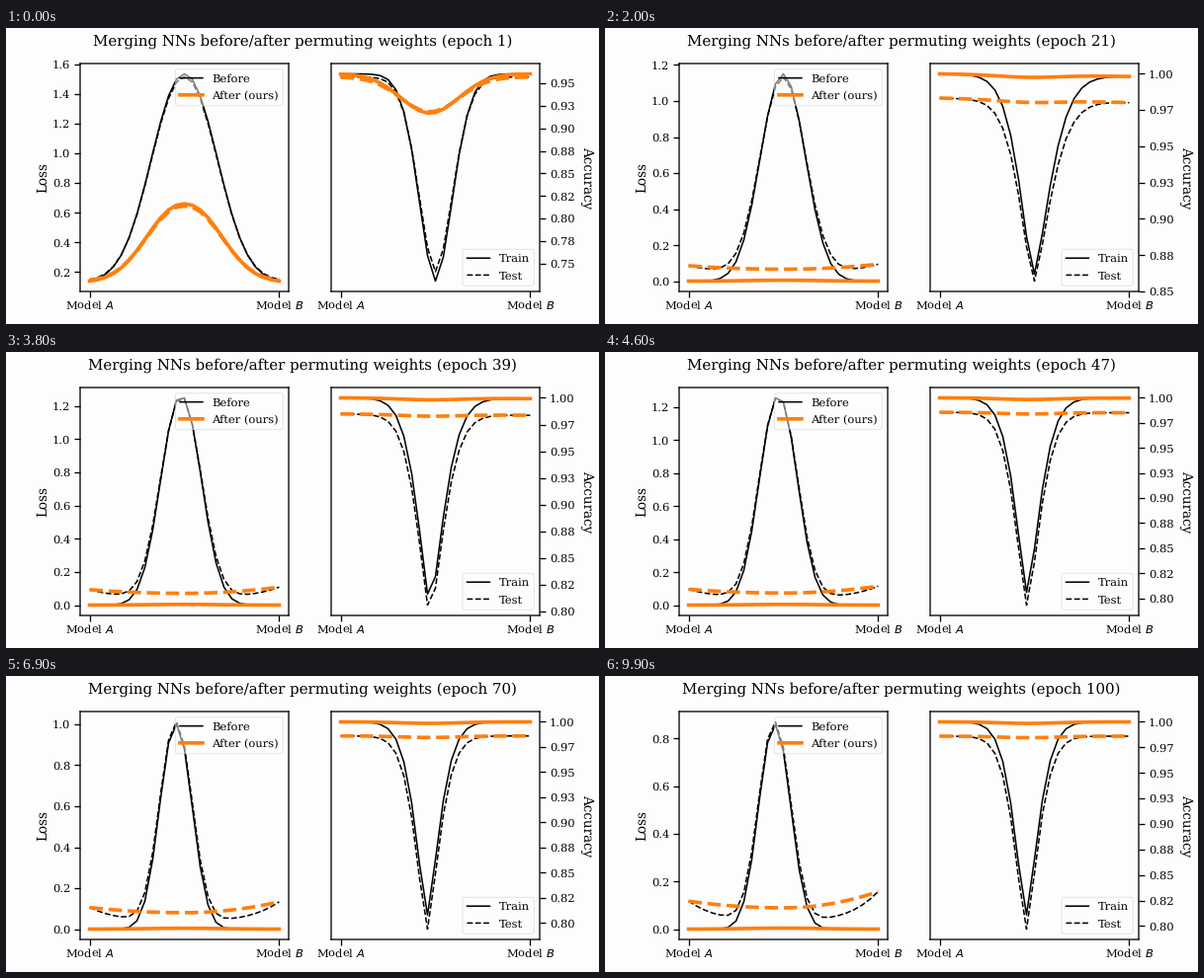
Animation, 600 px wide and 300 px high, one loop 10000 ms. Source, as a matplotlib script:

```python
import matplotlib.pyplot as plt
import numpy as np
from matplotlib.animation import FuncAnimation
from matplotlib.lines import Line2D
from matplotlib.ticker import FixedLocator, FuncFormatter, MultipleLocator

W, H, DPI = 600, 300, 75
FRAMES, INTERVAL = 100, 100
PAPER = "#fdfdfd"

plt.rcParams.update({
    "font.family": "DejaVu Serif",
    "font.size": 12,
    "text.hinting": "none",
    "path.snap": False,
    "legend.fontsize": 11,
    "legend.framealpha": 0.5,
    "legend.labelspacing": 0.57,
    "axes.linewidth": 1.25,
    "axes.facecolor": PAPER,
    "figure.facecolor": PAPER,
    "xtick.major.pad": 1.2,
})
for axis in ("xtick", "ytick"):
    plt.rcParams.update({
        f"{axis}.labelsize": 11,
        f"{axis}.major.size": 6,
        f"{axis}.major.width": 1.25,
    })

IDX = np.arange(25)
LAM = IDX / 24

# Height of the barrier between the two models at a few epochs.
KEYS = (1, 12, 31, 47, 70, 100)
LOSS_PEAK = (1.535, 1.025, 1.238, 1.257, 1.0, 0.857)
ACC_DIP = (0.23, 0.09, 0.17, 0.194, 0.192, 0.189)


def key(values, epoch):
    return np.interp(np.log(epoch), np.log(KEYS), values)


def fade(epoch):
    """Share of the early, untrained phase that is left."""
    return np.exp(-(epoch - 1) / 3)


def drift(epoch, end):
    """Smooth shift of the barrier from epoch 12 to its final place."""
    t = np.clip((epoch - 12) / (end - 12), 0, 1)
    return t * t * (3 - 2 * t)


def bump(centre, left, right, power):
    d = IDX - centre
    b = np.exp(-(np.abs(d) / np.where(d < 0, left, right)) ** power)
    return b / b.max()


def bowl(start, floor, end, power):
    fall = np.clip(1 - 2 * LAM, 0, 1) ** power
    rise = np.clip(2 * LAM - 1, 0, 1) ** power
    return floor + (start - floor) * fall + (end - floor) * rise


def loss(kind, split, e):
    f, d = fade(e), drift(e, 76)
    before, test = kind == "before", split == "test"
    if test:
        floor = 0.055 - 0.00015 * e + 0.08 * f if before else 0.06 + 0.0003 * e + 0.075 * f
        ends = 0.078 + 0.06 * f
        base = bowl(ends + 0.0004 * e, floor, ends + 0.0008 * e, 3.5 if before else 2)
    else:
        floor = 0.001 + 0.13 * f
        base = np.full(IDX.size, floor)
    if before:
        width = 4 - 1.2 * d + 1.7 * f
        peak = key(LOSS_PEAK, e) + (0.032 * d - 0.02) * test
        return base + (peak - floor) * bump(12 - 1.1 * d, width, width, 2.1)
    height = 0.51 * f if test else 0.525 * f + 0.004
    return base + height * bump(12, 6.3, 6.3, 2.2)


def accuracy(kind, split, e):
    f, d = fade(e), drift(e, 57)
    lag = (1 - d) * (1 - f)
    test = split == "test"
    if test:
        start = 0.986 - 0.029 * f - 0.003 * lag
        end = start - 0.0035 * lag
    else:
        start = 1 - 0.0395 * f
        end = start - 0.002 * lag
    base = start + (end - start) * LAM
    if kind == "before":
        dip = key(ACC_DIP, e) - 0.014 * (1 - d) * test
        return base - dip * bump(12 - 1.05 * d, 2.6 - 0.45 * d + 0.4 * f,
                                 3.1 - 0.9 * d, 1.45 + 0.4 * f)
    return base - (0.0015 + (0.037 if test else 0.042) * f) * bump(11.3, 5.2, 5.2, 2)


def panel(x0, x1, y0=36, y1=267):
    ax = fig.add_axes([x0 / W, 1 - y1 / H, (x1 - x0) / W, (y1 - y0) / H])
    ax.set_xticks([0, 1], ["Model $A$", "Model $B$"])
    return ax


def side_label(text, x, angle):
    fig.text(x / W, 1 - 151.5 / H, text, fontsize=13, rotation=angle,
             rotation_mode="anchor", ha="center", va="baseline")


fig = plt.figure(figsize=(W / DPI, H / DPI), dpi=DPI)
title = fig.suptitle("")
loss_ax, acc_ax = panel(75, 286), panel(329, 540)
side_label("Loss", 41, 90)
side_label("Accuracy", 584, 270)

loss_ax.yaxis.set_major_locator(MultipleLocator(0.2))
loss_ax.yaxis.set_major_formatter(FuncFormatter(lambda v, _: f"{abs(v):.1f}"))
acc_ax.yaxis.tick_right()
acc_ax.yaxis.set_major_locator(FixedLocator(np.arange(0.75, 1.01, 0.025)))
acc_ax.yaxis.set_major_formatter(FuncFormatter(lambda v, _: f"{round(v, 4):.2f}"))

STYLES = {
    "before": dict(color="black", lw=1.5),
    "after": dict(color="tab:orange", lw=3.5),
}
DASH = {"train": "-", "test": "--"}
lines = {}
for metric, ax in ((loss, loss_ax), (accuracy, acc_ax)):
    for kind, style in STYLES.items():
        for split, ls in DASH.items():
            lines[metric, kind, split], = ax.plot(
                LAM, metric(kind, split, 1), ls=ls, **style)

loss_ax.legend([Line2D([], [], **style) for style in STYLES.values()],
               ["Before", "After (ours)"], loc="upper right")
acc_ax.legend([Line2D([], [], ls=ls, **STYLES["before"]) for ls in DASH.values()],
              ["Train", "Test"], loc="lower right")


def update(i):
    epoch = i + 1
    title.set_text(f"Merging NNs before/after permuting weights (epoch {epoch})")
    for (metric, kind, split), line in lines.items():
        line.set_ydata(metric(kind, split, epoch))
    for ax in (loss_ax, acc_ax):
        ax.relim()
        ax.autoscale_view()
    return [title, *lines.values()]


anim = FuncAnimation(fig, update, frames=FRAMES, interval=INTERVAL,
                     repeat=True, repeat_delay=0, blit=False)
plt.show()
```
